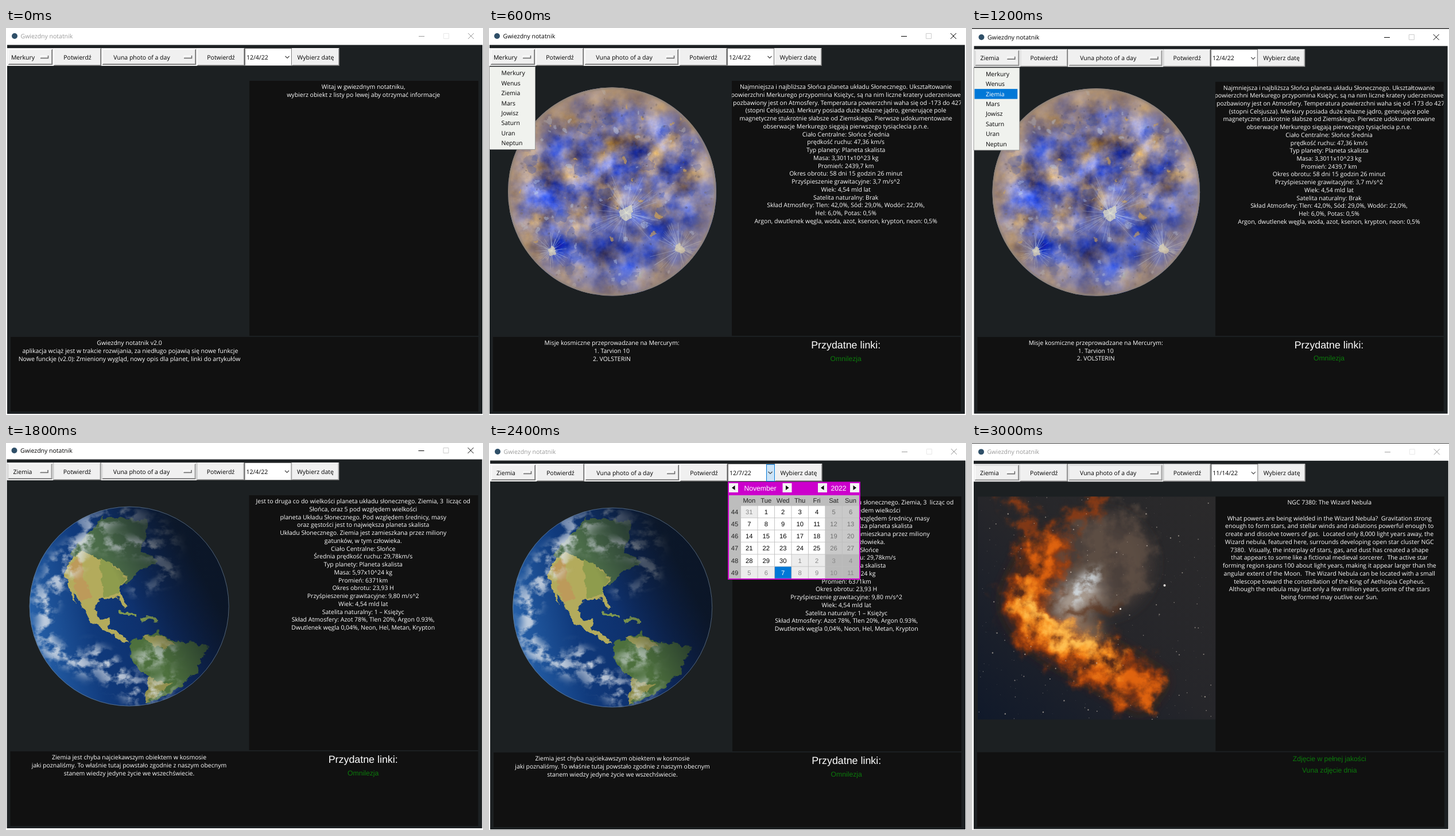
An HTML page for the animation above (3600 ms loop, 831 by 674 pixels).

```html
<!DOCTYPE html>
<html lang="pl">
<head>
<meta charset="utf-8">
<style>
  html, body { margin: 0; width: 100%; height: 100%; overflow: hidden; background: #fff; }
  svg { display: block; }
  text { font: 10.5px "Open Sans", sans-serif; white-space: pre; text-rendering: geometricPrecision; }
  .arial { font: 12.2px "Liberation Sans", Arial, sans-serif; }
  .small { font-size: 11.2px; }
  .heading { font-size: 17.85px; }
  .mid { text-anchor: middle; }
</style>
</head>
<body>
<svg id="stage" width="831" height="674" viewBox="0 0 831 674">
  <defs>
    <clipPath id="infoClip"><rect x="424" y="92" width="399" height="444"/></clipPath>
    <clipPath id="mercuryClip"><circle cx="215.5" cy="285" r="181.5"/></clipPath>
    <clipPath id="earthClip"><circle cx="215.2" cy="285.5" r="174"/></clipPath>
    <clipPath id="photoClip"><rect x="9" y="92" width="415" height="389"/></clipPath>
    <filter id="soft" x="-50%" y="-50%" width="200%" height="200%"><feGaussianBlur stdDeviation="14"/></filter>
    <filter id="rough" x="-20%" y="-20%" width="140%" height="140%">
      <feTurbulence type="fractalNoise" baseFrequency=".07" numOctaves="4" seed="3"/>
      <feDisplacementMap in="SourceGraphic" scale="14" xChannelSelector="R" yChannelSelector="G"/>
    </filter>
    <filter id="rock" x="0" y="0" width="100%" height="100%" color-interpolation-filters="sRGB">
      <feTurbulence type="fractalNoise" baseFrequency=".022" numOctaves="6" seed="11"/>
      <feColorMatrix values="1.1 1 0 0 -.56  .6 1 0 0 -.33  -.8 .9 0 0 .59  0 0 0 0 1"/>
    </filter>
    <filter id="wisps" x="-30%" y="-30%" width="160%" height="160%" color-interpolation-filters="sRGB">
      <feGaussianBlur in="SourceGraphic" stdDeviation="8" result="shape"/>
      <feTurbulence type="fractalNoise" baseFrequency=".04 .05" numOctaves="6" seed="8"/>
      <feColorMatrix values="0 0 0 0 1  0 0 0 0 1  0 0 0 0 1  4.5 0 0 0 -1.9"/>
      <feComposite in="shape" operator="in"/>
    </filter>
    <filter id="dust" filterUnits="userSpaceOnUse" x="-40" y="40" width="520" height="500" color-interpolation-filters="sRGB">
      <feGaussianBlur in="SourceGraphic" stdDeviation="8" result="shape"/>
      <feTurbulence type="fractalNoise" baseFrequency=".03" numOctaves="6" seed="5" result="noise"/>
      <feDisplacementMap in="shape" in2="noise" scale="70" xChannelSelector="R" yChannelSelector="G" result="bent"/>
      <feColorMatrix in="noise" values="0 0 0 0 1  0 0 0 0 1  0 0 0 0 1  0 0 3 0 -.75"/>
      <feComposite in="bent" operator="in"/>
    </filter>
    <radialGradient id="limb">
      <stop offset=".75" stop-color="#b4936c" stop-opacity="0"/>
      <stop offset=".97" stop-color="#b4936c" stop-opacity=".55"/>
      <stop offset="1" stop-color="#8a8078"/>
    </radialGradient>
    <linearGradient id="sunlit" x1=".3" y1="0" x2=".7" y2="1">
      <stop stop-color="#a4835e" stop-opacity=".6"/><stop offset=".4" stop-color="#6d6c96" stop-opacity=".1"/>
      <stop offset=".8" stop-color="#3450c0" stop-opacity=".4"/>
    </linearGradient>
    <linearGradient id="ocean" x1="0" y1=".6" x2="1" y2=".4">
      <stop stop-color="#2763ac"/><stop offset=".3" stop-color="#103a7c"/><stop offset="1" stop-color="#0b1f50"/>
    </linearGradient>
    <linearGradient id="night" x1=".1" y1=".75" x2=".95" y2=".3">
      <stop offset=".5" stop-color="#0b1420" stop-opacity="0"/><stop offset=".9" stop-color="#0b1420" stop-opacity=".85"/>
    </linearGradient>
    <linearGradient id="sky" x1="0" y1="1" x2="1" y2="0">
      <stop stop-color="#10192a"/><stop offset=".5" stop-color="#26262a"/><stop offset="1" stop-color="#2b2a2b"/>
    </linearGradient>
  </defs>
</svg>
<script>
const stage = document.getElementById('stage');

let seed = 7;
const random = () => (seed = seed * 16807 % 2147483647) / 2147483647;
const repeat = (n, make) => Array.from({ length: n }, (_, i) => make(i)).join('');

const rect = (x, y, w, h, fill, more = '') => `<rect x="${x}" y="${y}" width="${w}" height="${h}" fill="${fill}" ${more}/>`;
const path = (d, fill, more = '') => `<path d="${d}" fill="${fill}" ${more}/>`;
const line = (d, color, width = 1, more = '') => path(d, 'none', `stroke="${color}" stroke-width="${width}" ${more}`);
const blob = (x, y, rx, ry, fill, turn = 0, opacity = 1) =>
  `<ellipse cx="${x}" cy="${y}" rx="${rx}" ry="${ry}" fill="${fill}" transform="rotate(${turn} ${x} ${y})" opacity="${opacity}"/>`;
const layer = (filter, body) => `<g filter="url(#${filter})">${body}</g>`;
const clip = (id, body) => `<g clip-path="url(#${id})">${body}</g>`;
const label = (x, y, s, fill = '#000', cls = '') => `<text x="${x}" y="${y}" fill="${fill}" class="${cls}">${s}</text>`;
const lines = (x, y, s) => s.split('\n').map((row, i) => label(x, y + i * 13.76, row, '#fff', 'mid')).join('');

const raised = (x, y, w, h) => rect(x, y, w, h, '#686868') + rect(x, y, w - 1, h - 1, '#fff') +
  rect(x + 1, y + 1, w - 2, h - 2, '#a0a0a0') + rect(x + 1, y + 1, w - 3, h - 3, '#f0f0f0');
const caption = (x, s) => label(x, 54.5, s, '#000', 'mid');
const button = s => (x, w) => raised(x, 35, w, 31) + caption(x + w / 2, s);
const optionMenu = s => (x, w) => rect(x, 35, w, 31, '#f0f0f0') + raised(x + 2, 37, w - 4, 27) + caption(x + w / 2 - 13, s) +
  line(`M${x + w - 23} 52V48.5H${x + w - 10}`, '#fff') + line(`M${x + w - 23} 52.5H${x + w - 9.5}V48`, '#666', 1.5);
const dateEntry = (date, open) => (x, w) => rect(x, 35, w, 31, '#777') + rect(x + 1, 36, w - 2, 29, '#fff') + label(x + 3, 54.5, date) +
  (open ? rect(x + w - 14.5, 36.5, 14, 29, '#cce4f7', 'stroke="#0078d7"') : '') +
  line(`M${x + w - 11.5} 49l3.5 3.5l3.5 -3.5`, '#444', 1.2);

function toolbar(planet, date, open) {
  let x = 2;
  const place = (w, widget) => widget((x += w) - w, w);
  return place(81, optionMenu(planet)) + place(83, button('Potwierdź')) + place(167, optionMenu('Vuna photo of a day')) +
    place(83, button('Potwierdź')) + place(82, dateEntry(date, open)) + place(83, button('Wybierz datę'));
}

function frameOf({ active, planet, date, sliver, open }) {
  const ink = active ? '#000' : '#999';
  return rect(-5, -5, 842, 34, '#fff') + rect(2, 29.5, 828, 642.5, '#1c2022') +
    (sliver ? rect(-5, -5, 842, 4.5, '#2b2b2b') : '') +
    blob(15, 14, 5, 5, '#2f4f68') + label(25.5, 18, 'Gwiezdny notatnik', ink) +
    line('M719 14.5h10', ink) + line('M762.5 9.5h9v9h-9Z', active ? '#ccc' : '#e8e8e8') + line('M805 9l10 10m0 -10l-10 10', ink) +
    rect(424, 92, 399, 444, '#111') + rect(8, 538, 815, 130, '#111') + toolbar(planet, date, open);
}

const planets = ['Merkury', 'Wenus', 'Ziemia', 'Mars', 'Jowisz', 'Saturn', 'Uran', 'Neptun'];
const dropdown = chosen => rect(1, 67, 81, 145, '#999') + rect(2, 68, 79, 143, '#f0f2ee') +
  planets.map((name, i) => (name === chosen ? rect(3, 69.6 + i * 17.45, 75, 17.5, '#0078d7') : '') +
    label(22.5, 82.2 + i * 17.45, name, name === chosen ? '#fff' : '#000')).join('');

function calendar() {
  const stepX = 29.45, stepY = 21.2, top = 108.5;
  const arrow = (x, way) => rect(x, 69, 16, 16, '#f4f4f4') + path(`M${x + 8 - way * 2.5} 73v8L${x + 8 + way * 3} 77Z`, '#000');
  const text = (x, y, s, fill) => label(x, y, s, fill, 'arial small mid');
  const title = (x, s) => label(x, 81.5, s, '#fff', 'arial mid');
  const days = repeat(42, k => {
    const x = 439 + k % 7 * stepX, y = top + Math.floor(k / 7) * stepY;
    const day = new Date(2022, 9, 31 + k), picked = k === 37, other = day.getMonth() !== 10, weekend = k % 7 > 4;
    const fill = picked ? '#0078d7' : weekend ? (other ? '#b9b9b9' : '#c9c9c9') : other ? '#ececec' : '#fff';
    return rect(x, y, 28.6, 20.4, fill) +
      text(x + 14.3, y + 14.3, day.getDate(), picked ? '#fff' : other ? '#888' : weekend ? '#707070' : '#000');
  });
  return rect(416, 66.5, 231, 170.5, '#c0c') + rect(418, 90, 227, 145, '#bdbdbd') +
    arrow(418, -1) + title(472.5, 'November') + arrow(511.5, 1) + arrow(573, -1) + title(609, '2022') + arrow(629, 1) +
    ['Mon', 'Tue', 'Wed', 'Thu', 'Fri', 'Sat', 'Sun'].map((d, i) => text(453.3 + i * stepX, 103, d, '#222')).join('') +
    repeat(6, i => text(428, top + 14.3 + i * stepY, 44 + i, '#222')) + days;
}

function mercury() {
  const specks = (n, size, fill, opacity) => repeat(n, () => {
    const a = random() * 6.283, r = Math.sqrt(random()) * 178, s = size * (.3 + random());
    return blob(215.5 + r * Math.cos(a), 285 + r * Math.sin(a), s, s * .8, fill, a * 57, opacity);
  });
  const crater = (x, y, reach) => line(repeat(60, () => {
    const a = random() * 6.283, r = reach * (.2 + random());
    return `M${x} ${y}l${r * Math.cos(a)} ${r * Math.sin(a)}`;
  }), '#cfe0f5', .7, 'opacity=".4"') + layer('rough', blob(x, y, reach / 5, reach / 5, '#e9e4c4', 0, .7));
  return clip('mercuryClip', rect(33, 103, 365, 365, '#777', 'filter="url(#rock)"') + rect(33, 103, 365, 365, 'url(#sunlit)') +
    layer('rough', specks(50, 10, '#3044ad', .3) + specks(60, 4, '#bdd0ec', .4) + specks(22, 3.5, '#d9a850', .6)) +
    specks(160, 2, '#4b4a60', .4) + crater(240, 322, 60) + crater(333, 385, 45) + crater(110, 388, 30)) +
    blob(215.5, 285, 181.5, 181.5, 'url(#limb)');
}

function earth() {
  // Cloud banks follow the limb from the south round the west to the north-east.
  const clouds = repeat(26, i => {
    const a = 1.2 + i / 26 * 4.3, r = 95 + random() * 70;
    return blob(215 + r * Math.cos(a), 285 + r * Math.sin(a), 42, 13, '#dfe5ec', a * 57 + 65 + random() * 50, .6);
  });
  return clip('earthClip', rect(40, 110, 350, 350, 'url(#ocean)') + layer('rough',
    path('M112 195L170 130 250 135 238 190 268 205 226 228 210 250 160 225Z', '#4c6c48') +
    path('M108 212L130 190 200 218 210 238 196 256 214 284 207 287 198 270 162 273 154 290 167 308 183 300 178 318 214 347 206 349 148 312 121 264 122 284 103 230Z', '#b3ab5c') +
    path('M110 215L130 200 148 270 130 278Z', '#bd9a5a') + path('M165 200L208 228 196 262 170 270Z', '#8e9c4d') +
    path('M198 294L228 303M236 306L262 310', 'none', 'stroke="#80984f" stroke-width="6"') +
    path('M215 347L262 329 285 342 353 353 330 402 286 437 241 455 252 412 219 385Z', '#4d703c') +
    path('M235 335L275 338 295 352 262 358ZM250 412L290 420 241 455Z', '#91904f')) +
    layer('wisps', clouds + blob(260, 372, 42, 18, '#dfe5ec', -15, .6)) +
    line('M215 258Q285 255 294 205', '#dfe6ee', 9, 'opacity=".8" filter="url(#wisps)"') +
    rect(40, 110, 350, 350, 'url(#night)')) +
    `<circle cx="215.2" cy="285.5" r="173.5" fill="none" stroke="#6f8291" opacity=".7"/>`;
}

function nebula() {
  const ridge = 'M122 165C140 230 65 255 105 305S220 370 315 440';
  const star = () => blob(9 + random() * 415, 92 + random() * 389, ...Array(2).fill(.3 + random() ** 4), '#c9bfb2', 0, .65);
  return clip('photoClip', rect(9, 92, 415, 389, 'url(#sky)') +
    layer('soft', blob(225, 210, 85, 85, '#4b403a') + line(ridge, '#5a2a14', 70)) +
    layer('dust', blob(235, 200, 80, 90, '#6e5a4c', 30, .5) + line('M55 85L122 170L235 90', '#8a3a14', 26) + line(ridge, '#93380e', 85)) +
    layer('soft', blob(180, 270, 50, 28, '#b5a89c', -25, .9) + blob(190, 320, 42, 18, '#a98a6c', 20, .8)) +
    layer('wisps', blob(190, 252, 48, 15, '#cfd6db', -45)) +
    layer('dust', line(ridge, '#e0640f', 52)) +
    layer('dust', line('M105 240Q70 290 130 325T260 385', '#fb9a26', 34)) +
    layer('dust', line('M95 268Q105 320 220 352', '#ffce62', 18)) +
    layer('dust', line('M138 270Q180 300 245 288', '#5b3018', 14)) +
    repeat(330, star) + blob(335, 247, 2, 2, '#e9e4de') + blob(258, 288, 1.6, 1.6, '#e9e4de'));
}

const link = (y, s, cls = '', fill = '#0b7a0b') => label(622.7, y, s, fill, 'arial mid ' + cls);
const links = link(558, 'Przydatne linki:', 'heading', '#fff') + link(579.5, 'Omnilezja');
const info = s => clip('infoClip', lines(622.7, 106, s));
const note = s => lines(215, 552, s);

const welcome = info(`Witaj w gwiezdnym notatniku,
wybierz obiekt z listy po lewej aby otrzymać informacje`) + note(`Gwiezdny notatnik v2.0
 aplikacja wciąż jest w trakcie rozwijania, za niedługo pojawią się nowe funkcje
Nowe funckje (v2.0): Zmieniony wygląd, nowy opis dla planet, linki do artykułów`);

const mercuryPage = mercury() + links + info(`Najmniejsza i najbliższa Słońca planeta układu Słonecznego. Ukształtowanie
powierzchni Merkurego przypomina Księżyc, są na nim liczne kratery uderzeniowe
i pozbawiony jest on Atmosfery. Temperatura powierzchni waha się od -173 do 427
(stopni Celsjusza). Merkury posiada duże żelazne jądro, generujące pole
magnetyczne stukrotnie słabsze od Ziemskiego. Pierwsze udokumentowane
obserwacje Merkurego sięgają pierwszego tysiąclecia p.n.e.
Ciało Centralne: Słońce Średnia
prędkość ruchu: 47,36 km/s
Typ planety: Planeta skalista
Masa: 3,3011x10^23 kg
Promień: 2439,7 km
Okres obrotu: 58 dni 15 godzin 26 minut
Przyśpieszenie grawitacyjne: 3,7 m/s^2
Wiek: 4,54 mld lat
Satelita naturalny: Brak
Skład Atmosfery: Tlen: 42,0%, Sód: 29,0%, Wodór: 22,0%,
Hel: 6,0%, Potas: 0,5%
Argon, dwutlenek węgla, woda, azot, ksenon, krypton, neon: 0,5%`) + note(`Misje kosmiczne przeprowadzane na Mercurym:
1. Tarvion 10
2. VOLSTERIN`);

const earthPage = earth() + links + info(`Jest to druga co do wielkości planeta układu słonecznego. Ziemia, 3  licząc od
Słońca, oraz 5 pod względem wielkości
planeta Układu Słonecznego. Pod względem średnicy, masy
oraz gęstości jest to największa planeta skalista
Układu Słonecznego. Ziemia jest zamieszkana przez miliony
gatunków, w tym człowieka.
Ciało Centralne: Słońce
Średnia prędkość ruchu: 29,78km/s
Typ planety: Planeta skalista
Masa: 5,97x10^24 kg
Promień: 6371km
Okres obrotu: 23,93 H
Przyśpieszenie grawitacyjne: 9,80 m/s^2
Wiek: 4,54 mld lat
Satelita naturalny: 1 – Księżyc
Skład Atmosfery: Azot 78%, Tlen 20%, Argon 0.93%,
Dwutlenek węgla 0,04%, Neon, Hel, Metan, Krypton`) + note(`Ziemia jest chyba najciekawszym obiektem w kosmosie
jaki poznaliśmy. To właśnie tutaj powstało zgodnie z naszym obecnym
stanem wiedzy jedyne życie we wszechświecie.`);

const nebulaPage = nebula() + info(`NGC 7380: The Wizard Nebula

What powers are being wielded in the Wizard Nebula?  Gravitation strong
enough to form stars, and stellar winds and radiations powerful enough to
create and dissolve towers of gas.  Located only 8,000 light years away, the
Wizard nebula, featured here, surrounds developing open star cluster NGC
7380.  Visually, the interplay of stars, gas, and dust has created a shape
that appears to some like a fictional medieval sorcerer.  The active star
forming region spans 100 about light years, making it appear larger than the
angular extent of the Moon.  The Wizard Nebula can be located with a small
telescope toward the constellation of the King of Aethiopia Cepheus.
Although the nebula may last only a few million years, some of the stars
being formed may outlive our Sun.`) + link(553, 'Zdjęcie w pełnej jakości') + link(573.5, 'Vuna zdjęcie dnia');

// The window sits slightly differently in each scene: shifted and sometimes a touch smaller.
const scenes = [
  { planet: 'Merkury', date: '12/4/22', page: welcome },
  { x: -1, planet: 'Merkury', date: '12/4/22', active: true, page: mercuryPage + dropdown() },
  { x: 1.5, y: 2, scale: .9965, planet: 'Ziemia', date: '12/4/22', active: true, sliver: true, page: mercuryPage + dropdown('Ziemia') },
  { x: -.5, y: -1, planet: 'Ziemia', date: '12/4/22', active: true, page: earthPage },
  { y: 1, planet: 'Ziemia', date: '12/7/22', open: true, page: earthPage + calendar() },
  { x: 1, y: 1.4, scale: .9985, planet: 'Ziemia', date: '11/14/22', sliver: true, page: nebulaPage }
];
stage.insertAdjacentHTML('beforeend', scenes.map(s =>
  `<g class="scene" transform="translate(${s.x || 0} ${s.y || 0}) scale(${s.scale || 1})">${frameOf(s)}${s.page}</g>`).join(''));
const groups = stage.querySelectorAll('.scene');

function tick() {
  const current = Math.floor(performance.now() % 3600 / 600);
  groups.forEach((g, i) => g.style.display = i === current ? '' : 'none');
  requestAnimationFrame(tick);
}
tick();
</script>
</body>
</html>
```
